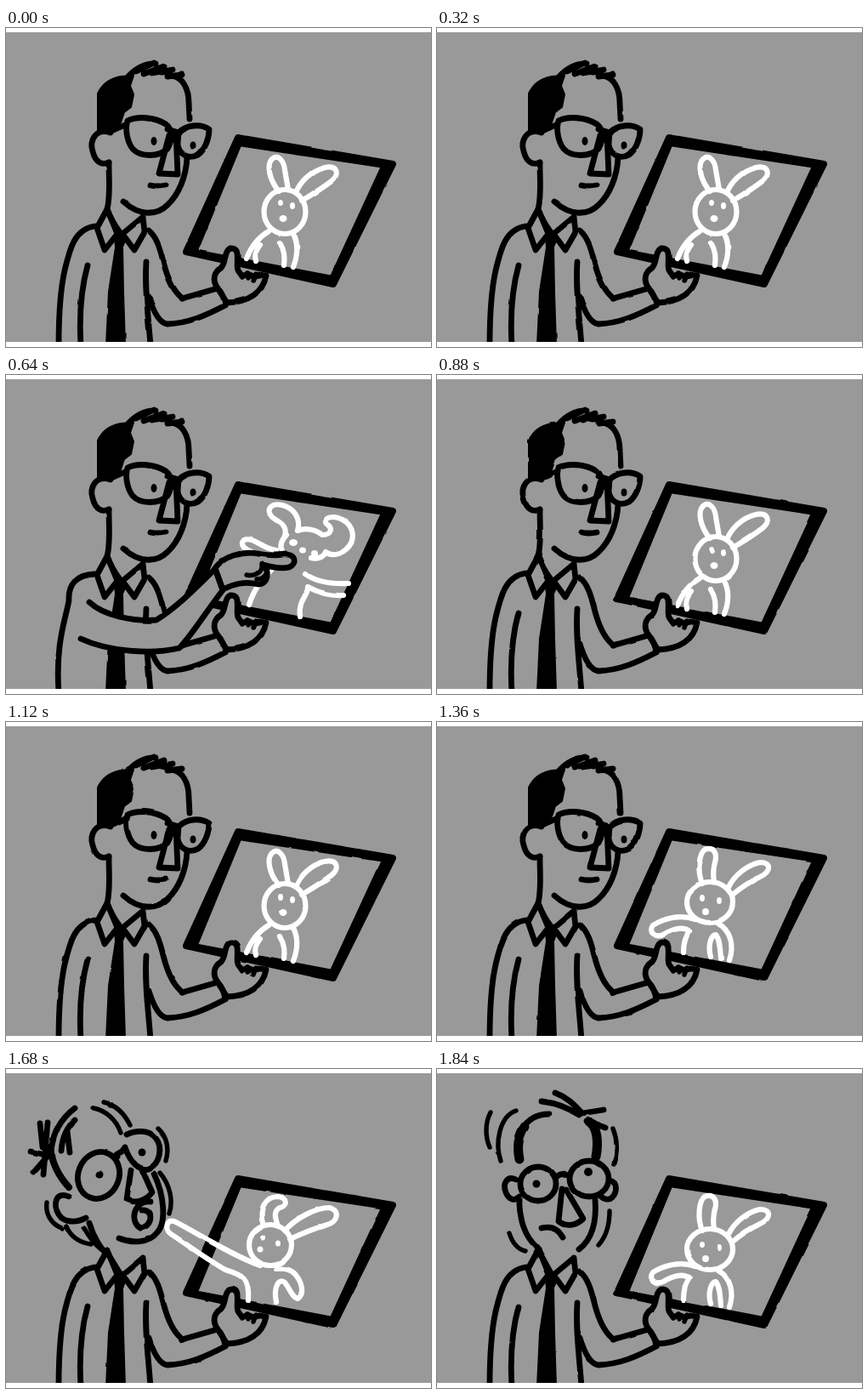
These frames come from a looping animation (500x375 px, 1.92 s). An HTML page:

```html
<!DOCTYPE html>
<html lang="en">
<head>
<meta charset="utf-8">
<title>Tablet rabbit</title>
<style>
html, body { margin: 0; width: 100%; height: 100%; overflow: hidden; background: #fff; }
svg { display: block; width: 100vw; height: 100vh; }
.ink { fill: none; stroke: #000; stroke-width: 6.8; stroke-linecap: round; stroke-linejoin: round; }
.chalk { fill: none; stroke: #fff; stroke-width: 6.2; stroke-linecap: round; stroke-linejoin: round; }
.skin { fill: #999; }
.thin { stroke-width: 5.4; }
.thick { stroke-width: 11; }
.black { fill: #000; }
.dots { stroke: none; }
.ink .dots { fill: #000; }
.chalk .dots { fill: #fff; }
</style>
</head>
<body>
<svg viewBox="0 0 500 375" preserveAspectRatio="none">
  <defs>
    <clipPath id="stage"><rect y="5" width="500" height="364"/></clipPath>
    <filter id="wobble" filterUnits="userSpaceOnUse" x="0" y="0" width="500" height="375" color-interpolation-filters="sRGB">
      <feTurbulence id="noise" type="fractalNoise" baseFrequency=".045" numOctaves="1" seed="1"/>
      <feDisplacementMap in="SourceGraphic" scale="2.4" xChannelSelector="R" yChannelSelector="G"/>
    </filter>
  </defs>
  <rect y="5" width="500" height="364" fill="#999"/>
  <g clip-path="url(#stage)"><g filter="url(#wobble)">
    <g class="ink">
      <g id="armRest">
        <path d="M104 233C80 237 75 260 69 285C63 312 62 340 62 373"/>
        <path d="M96 279C88 308 86 340 88 373"/>
      </g>
      <path d="M165 275C163 305 167 335 170 373"/>
      <path class="black" stroke-width="2" d="M128 246L134 240L142 246L137 257L138 310L140 373H118L121 310L129 258Z"/>
      <path d="M119 213L107 235L116 261L131 242L119 213M161 222L137 242L151 261L163 240L161 222"/>
      <path d="M168 238C181 249 183 270 188 285C193 301 200 312 208 318"/>
    </g>

    <path class="ink black" style="stroke-width:8" fill-rule="evenodd" d="M273 129L455 160L385 301L212 263ZM274 135L446 161L384 295L221 264Z"/>

    <g class="chalk" id="rabbitCalm">
      <ellipse cx="328" cy="216" rx="24.5" ry="26"/>
      <path d="M321 192C310 179 306 161 313 154C320 148 327 156 328 167L332 190M341 194C345 182 358 168 375 164C390 161 393 172 383 180C370 190 358 197 348 203"/>
      <path d="M309 239C297 246 288 258 283 271M299 255C293 263 292 268 294 274M338 242C344 254 343 268 338 281M322 252C328 262 328 270 327 279"/>
      <g class="dots"><ellipse cx="323" cy="206" rx="3" ry="4"/><ellipse cx="337" cy="209" rx="3" ry="4"/><ellipse cx="326" cy="224" rx="4.5" ry="4"/></g>
    </g>

    <g class="chalk" id="rabbitPoked">
      <path d="M328 189C332 176 320 173 313 167C305 158 312 150 325 153C340 157 347 170 343 183C353 179 365 182 372 188C383 188 385 180 377 175C372 168 384 164 396 170C410 178 412 195 400 205C392 212 382 213 376 208C374 214 366 217 359 215M330 188C324 194 322 201 325 207"/>
      <path d="M318 206C303 205 290 189 280 194C274 200 282 206 294 210M320 221C303 238 292 250 286 270"/>
      <path d="M352 234C365 243 384 246 403 245M397 259C380 260 366 255 355 249C357 258 343 264 346 284"/>
      <g class="dots"><ellipse cx="338" cy="197" rx="5" ry="4"/><ellipse cx="363" cy="210" rx="4" ry="4"/><ellipse cx="349" cy="206" rx="4" ry="3.5"/></g>
    </g>

    <g class="chalk" id="rabbitRaised">
      <ellipse cx="321" cy="212" rx="27" ry="24"/>
      <path d="M312 190C306 175 308 155 315 150C326 146 330 155 327 165C324 176 325 182 326 188M343 194C350 180 365 168 380 165C394 165 393 176 380 182C368 188 357 195 349 202"/>
      <path d="M304 232C285 225 265 232 254 239C248 247 257 254 266 250C278 243 290 240 297 246C290 255 290 265 290 271"/>
      <path d="M331 237C345 245 350 262 344 280M322 276C318 262 323 250 328 250C333 256 333 268 334 278"/>
      <g class="dots"><ellipse cx="312" cy="207" rx="3" ry="4"/><ellipse cx="332" cy="210" rx="3" ry="4"/><ellipse cx="316" cy="223" rx="4" ry="4"/></g>
    </g>

    <g class="chalk" id="rabbitSlap">
      <ellipse cx="311" cy="207" rx="25" ry="24"/>
      <path d="M303 184C296 165 305 150 320 150C333 152 330 162 322 163C313 168 318 178 320 185M328 190C341 175 365 163 380 163C394 166 390 180 378 183C360 188 347 194 334 200"/>
      <path d="M299 231C266 219 232 197 200 180C190 174 185 188 194 194C214 207 235 223 258 236C278 242 287 246 285 272"/>
      <path d="M318 274C314 255 322 245 328 251C334 258 336 268 343 270C352 265 348 250 340 241C334 235 326 234 318 235"/>
      <g class="dots"><ellipse cx="302" cy="198" rx="3" ry="3.5"/><ellipse cx="320" cy="205" rx="3" ry="3.5"/><ellipse cx="299" cy="212" rx="3.5" ry="3.5"/></g>
    </g>

    <g class="ink">
      <path class="skin" d="M249 306C242 296 245 287 253 282C258 277 257 268 260 263C263 257 271 258 272 265C273 274 271 280 273 285L278 292L284 289L291 292L298 290L306 291C302 312 285 322 260 323Z"/>
      <path class="thin" d="M273 284L278 293M284 288L285 294M294 289L291 297"/>
      <path d="M168 316C173 332 180 347 190 348C215 347 235 338 258 326M207 318L249 306Q256 313 258 326"/>
    </g>

    <g class="ink" id="armPoke">
      <path d="M104 234C83 235 73 246 74 265C70 288 58 315 62 373"/>
      <path class="skin" stroke="none" d="M98 267C115 283 150 289 177 288L246 228L254 254L204 322C170 330 120 325 88 310Z"/>
      <path d="M98 267C115 283 150 290 177 288C205 270 225 248 246 228L255 253C237 276 220 304 204 321C170 329 120 325 88 310"/>
      <path class="skin" d="M246 227C256 213 277 207 296 210C308 212 316 213 327 211C341 210 343 222 333 226C322 229 310 225 302 223C311 231 308 246 297 246C280 242 268 246 255 252Z"/>
      <path class="thin" d="M301 223C302 233 292 237 283 235M307 232C305 237 300 240 295 240"/>
    </g>

    <g class="ink" id="headCalm">
      <path d="M121 158C121 180 123 197 119 213C124 226 130 235 134 240"/>
      <path d="M123 123C105 117 98 133 102 145C105 157 112 162 121 158"/>
      <path class="black" stroke-width="2" d="M108 77C113 67 120 60 135 57L150 56L146 68L150 78L147 93L139 99L135 111L126 122L108 122Z"/>
      <path d="M143 58C152 47 165 41 176 42M153 51L174 41M162 54L186 45M172 53L196 49M183 52L193 51M190 57L207 55M194 56C208 57 215 72 215 88L216 107"/>
      <path d="M122 122L142 113M143 109C155 103 175 105 188 113C195 118 197 130 190 142C180 152 158 152 149 142C142 133 140 118 143 109ZM190 119L203 123M203 123C212 114 228 112 239 119C239 130 234 143 226 149C215 155 204 149 202 137Z"/>
      <path d="M192 126L180 171L202 172L200 126M170 185Q178 187 188 185M213 152C212 175 203 196 190 208C178 220 158 222 138 204"/>
      <g class="dots"><ellipse cx="174" cy="133" rx="3.5" ry="5"/><ellipse cx="220" cy="138" rx="3.5" ry="4.5"/></g>
    </g>

    <g class="ink" id="headHit">
      <path d="M98 181C103 198 112 213 121 219L134 240"/>
      <path d="M81 46C65 58 55 76 53 97M81 60C70 70 66 82 65 96M72 73L75 98M40 64L43 92M49 63L44 124M29 97L55 103M33 121L52 99"/>
      <path class="thick" style="stroke-width:8" d="M52 92C54 110 62 126 74 139"/>
      <path d="M74 150C58 143 55 160 62 171C68 181 83 181 94 175"/>
      <path class="thin" d="M115 39C128 42 139 52 146 66M103 46C118 49 130 60 135 75M48 157C46 171 54 183 66 187M71 185C76 197 87 204 100 206M92 187C98 198 104 206 112 212M179 70C190 80 192 95 188 108M181 122C193 136 197 155 192 170"/>
      <ellipse cx="109" cy="125" rx="24" ry="28" transform="rotate(22 109 125)"/>
      <path d="M131 103C127 98 136 101 140 92M142 77C152 72 168 71 176 81C185 92 181 112 168 117C157 120 146 110 140 92"/>
      <path d="M147 119L142 153C153 160 166 153 172 145L160 118M170 156C150 155 145 179 158 187C172 186 175 165 160 166M174 123C186 148 189 180 178 192C168 205 148 205 133 199"/>
      <g class="dots"><circle cx="110" cy="124" r="4.5"/><circle cx="160" cy="98" r="4.5"/></g>
    </g>

    <g class="ink" id="headShake">
      <path d="M118 211L134 240M97 152C96 175 103 197 118 210M186 153C188 178 184 199 167 212"/>
      <path class="thick" d="M103 68C95 80 94 92 97 106M179 62C189 68 190 87 187 103"/>
      <path d="M100 71C108 57 119 53 132 53M123 38C140 40 155 46 167 54M139 28C155 34 163 44 171 52L196 48M176 61L198 69"/>
      <path class="thin" d="M63 51C56 64 57 81 62 92M93 49C73 56 68 88 75 108M207 70C213 85 212 100 208 112M85 193C89 205 95 212 104 214M203 167C203 185 198 198 190 207"/>
      <path d="M93 130C82 125 77 135 81 145C85 155 92 155 97 150M203 131C213 133 212 145 206 151C202 155 196 153 192 149M141 127Q149 122 156 126"/>
      <ellipse cx="119" cy="135" rx="21" ry="20"/>
      <ellipse cx="179" cy="129" rx="23" ry="21"/>
      <path d="M147 141L143 179C153 187 165 183 172 176L152 142M124 187C135 184 143 189 148 198"/>
      <g class="dots"><circle cx="117" cy="135" r="4.5"/><circle cx="178" cy="121" r="5"/></g>
    </g>
  </g></g>
</svg>
<script>
const LOOP = 1920, STEP = 80;
const byId = id => document.getElementById(id);
const poses = {
  head: ['Calm', 'Hit', 'Shake'],
  rabbit: ['Calm', 'Poked', 'Raised', 'Slap'],
  arm: ['Rest', 'Poke']
};

// Each cue: start time, head pose, rabbit pose, free arm pose.
const cues = [
  [0, 'Calm', 'Calm', 'Rest'],
  [640, 'Calm', 'Poked', 'Poke'],
  [880, 'Calm', 'Calm', 'Rest'],
  [1280, 'Calm', 'Raised', 'Rest'],
  [1440, 'Hit', 'Slap', 'Rest'],
  [1520, 'Shake', 'Raised', 'Rest'],
  [1680, 'Hit', 'Slap', 'Rest'],
  [1760, 'Shake', 'Raised', 'Rest']
];

function setPose(part, current) {
  for (const pose of poses[part]) {
    byId(part + pose).style.display = pose === current ? '' : 'none';
  }
}

let lastStep = -1;
function draw(now) {
  const step = Math.floor(now % LOOP / STEP);
  if (step === lastStep) return;
  lastStep = step;
  const [, head, rabbit, arm] = cues.filter(cue => cue[0] <= step * STEP).pop();
  setPose('head', head);
  setPose('rabbit', rabbit);
  setPose('arm', arm);
  byId('noise').setAttribute('seed', 1 + step % 4);
}

const start = performance.now();
function tick() {
  draw(performance.now() - start);
  requestAnimationFrame(tick);
}
tick();
</script>
</body>
</html>
```
